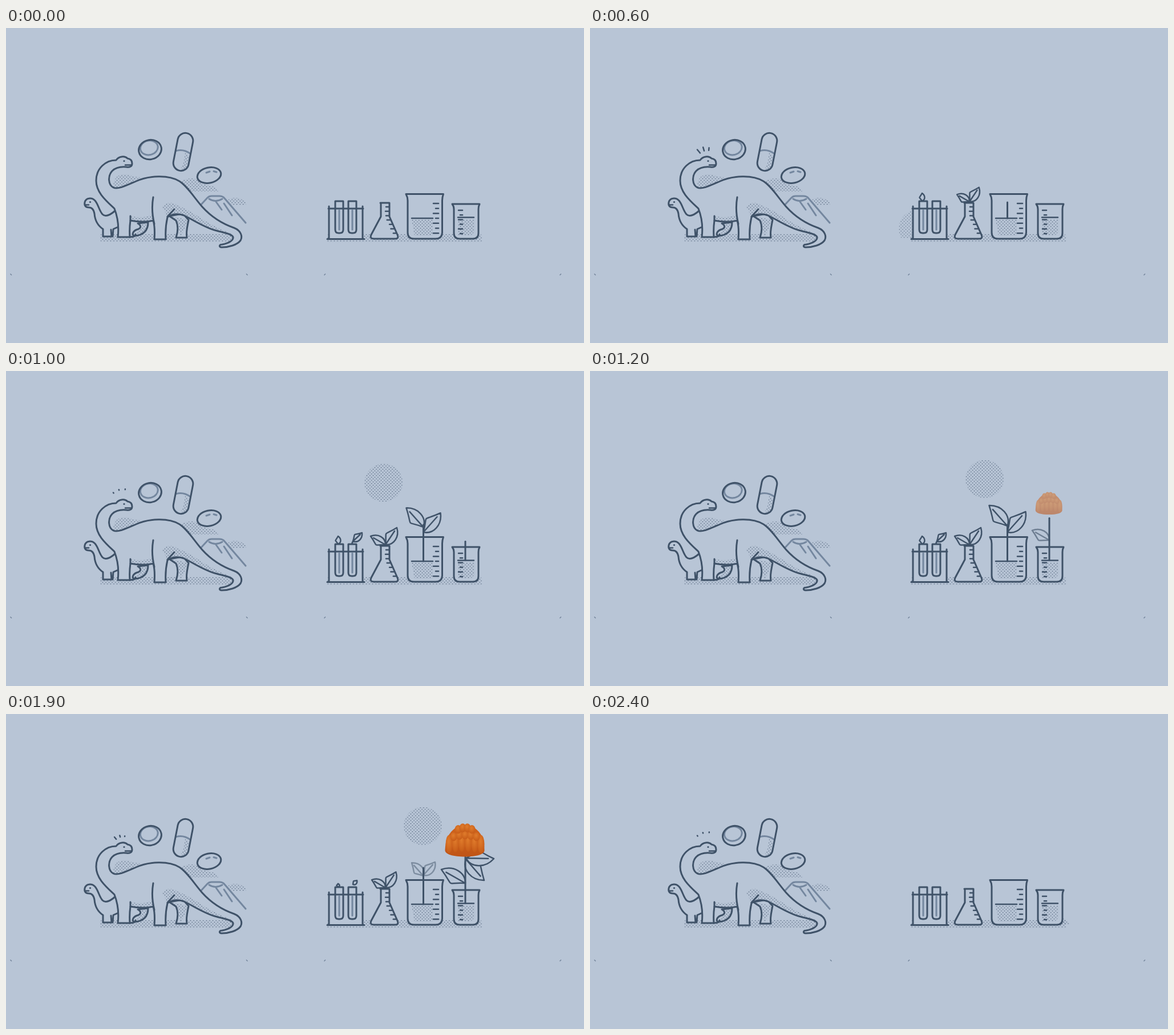
An HTML page that plays this animation: 1013 by 553 pixels, repeating every 2.5 s.

```html
<!DOCTYPE html>
<html lang="en">
<head>
<meta charset="utf-8">
<title>Growing lab</title>
<style>
  html, body { margin: 0; width: 100%; height: 100%; overflow: hidden; background: #b8c5d6; }
  svg { display: block; width: 1013px; height: 553px; }
  .ink { fill: none; stroke: #3f5268; stroke-width: 3; stroke-linecap: round; stroke-linejoin: round; }
  .solid { fill: #b8c5d6; }
  .thin { stroke-width: 2.5; }
  .soft { fill: none; stroke: #74879f; stroke-width: 3; stroke-linecap: round; stroke-linejoin: round; }
  .dots { fill: url(#dots); stroke: none; }
  .eye { fill: #3f5268; stroke: none; }
</style>
</head>
<body>
<svg viewBox="0 0 1013 553">
  <defs>
    <pattern id="dots" width="5.6" height="5.6" patternUnits="userSpaceOnUse">
      <circle cx="1.4" cy="1.4" r=".8" fill="#455870"/>
      <circle cx="4.2" cy="4.2" r=".8" fill="#455870"/>
    </pattern>
    <linearGradient id="jellyBody" x2="0" y2="1">
      <stop offset="0" stop-color="#d0641d"/>
      <stop offset="1" stop-color="#c05416"/>
    </linearGradient>
    <radialGradient id="jellyBump" cx=".45" cy=".35" r=".65">
      <stop offset="0" stop-color="#e07c2c"/>
      <stop offset="1" stop-color="#c75c18"/>
    </radialGradient>
    <clipPath id="sky"><rect width="1013" height="369"/></clipPath>
  </defs>

  <path d="M7.5 431.5l2.5 2.5M421 431.5l2.5 2.5M560 431.5l-2.5 2.5M973 431.5l-2.5 2.5" stroke="#74859b" stroke-width="1.5"/>

  <!-- clouds, ground, volcano -->
  <g class="dots">
    <rect x="165" y="362" width="232" height="13" rx="3"/>
    <path d="M188 279C188 262 198 256 209 257C217 257 219 262 238 262L200 281Z"/>
    <path d="M306 269C318 263 334 262 340 270C344 278 370 274 372 287H322Z"/>
    <path d="M387 303C396 294 421 298 421 311H396Z"/>
  </g>
  <path class="soft" d="M341 311L353 298Q356 295 360 295H374Q380 295 383 299L420 342M356 300Q367 307 379 300M368 305L378 319M382 308L396 329"/>

  <!-- dinosaurs -->
  <g class="ink">
    <path class="solid" d="M191 321C183 328 175 333 169 327C163 320 162 310 156 303C150 297 140 298 138 306C137 311 139 315 145 315C151 315 154 320 155 326C156 339 161 347 170 353V366H185L184 354M183 366H187L188 353L197 349"/>
    <path class="thin" d="M139 310.5H145"/>
    <circle class="eye" cx="147.5" cy="305.5" r="1.6"/>

    <g id="farLegs">
      <path class="solid" d="M231 343C238 347 237 352 229 354C222 357 220 363 225 365C237 364 249 359 249 341Z"/>
      <path class="solid" d="M286 330L298 338C302 347 302 356 298 368H317C315 357 318 348 320 337L310 326Z"/>
    </g>
    <path class="dots" d="M231 343Q240 350 225 363Q249 360 249 341ZM286 330L299 340L306 366L320 337Z"/>

    <path class="solid" d="M190 317C174 302 158 288 158 268C158 246 175 232 193 232C198 225 208 224 213 229C220 230 221 234 221 238C221 243 217 245 211 244C200 243 192 245 186 251C178 260 179 275 188 280C196 284 212 276 228 269C250 259 285 257 304 269C318 278 330 298 344 314C362 334 380 344 400 351C412 356 415 366 411 373C405 381 390 385 378 385C373 385 373 380 379 380C390 378 399 373 398 367C396 361 380 359 366 355C345 349 325 335 312 329C300 325 290 327 283 332C280 345 279 356 280 371H260C261 357 261 348 258 338Q240 342 218 338Q216 352 217 367H196C198 350 197 335 190 317Z"/>
    <path class="dots" d="M219 330Q240 336 257 327V337Q240 341 219 337ZM274 314C280 305 292 305 300 311Q318 318 345 336Q366 350 396 361C360 353 344 346 326 334Q305 322 283 331Z"/>
    <path d="M218 338V330M258 297Q254 320 260 344M283 331L295 318M217 367Q227 367 227 362"/>
    <path class="thin" d="M209 240.5H220"/>
    <circle class="eye" cx="207" cy="233.5" r="1.6"/>
  </g>

  <!-- pills -->
  <g transform="rotate(-12 252.5 213.5)">
    <ellipse class="soft" cx="251.5" cy="210" rx="15.5" ry="12.5"/>
    <ellipse class="ink" cx="252.5" cy="213.5" rx="20" ry="17"/>
  </g>
  <g transform="rotate(11 310.5 217.5)">
    <path class="dots" d="M314 219L323 222V238Q321 248 311 249Q317 238 314 219Z"/>
    <path class="soft" d="M298 218Q310 212 323 218"/>
    <rect class="ink" x="297" y="184" width="27" height="67" rx="13.5"/>
  </g>
  <ellipse class="ink" cx="356" cy="258.5" rx="21" ry="13.5" transform="rotate(-12 356 258.5)"/>
  <path class="soft" d="M351 254L357 252M364 251.5L369 253"/>
  <g id="burst"></g>

  <!-- laboratory -->
  <g clip-path="url(#sky)"><circle id="sun" class="dots" r="33.5"/></g>
  <rect class="dots" x="563" y="362" width="271" height="14" rx="3"/>
  <g id="tubePlants"></g>
  <g id="glass" class="ink">
    <path class="solid" d="M566 317H625V370H566Z" stroke="none"/>
    <path class="solid" d="M577 304h14v50q0 6 -6 6h-2q-6 0 -6 -6ZM600 304h14v50q0 6 -6 6h-2q-6 0 -6 -6Z"/>
    <path class="soft" d="M584 320V354M607 320V354"/>
    <path d="M566 313V370M625 313V370M565 317H626M563 370.5H628"/>
    <path class="solid" d="M656 307H672V331L686 363Q689 370 682 370H645Q637 370 640 363L657 331V307"/>
    <path class="solid" d="M701 291.5H766.5Q764.5 297 764.5 303V359Q764 370 753 370H715Q704 370 704 359V303Q704 297 701 291.5Z"/>
    <path class="solid" d="M782 309H830Q828 313 828 318V360Q828 370 818 370H795Q785 370 785 360V318Q785 313 782 309Z"/>
    <path class="dots" d="M711 337H748V365H716ZM792 336H821V358L815 364H792Z"/>
    <path class="thin" d="M711 334H748M792 332.5H820"/>
  </g>
  <g id="plants"></g>
  <g id="jelly"></g>
</svg>

<script>
const $ = id => document.getElementById(id);
const clamp = v => Math.max(0, Math.min(1, v));
const parts = []; // each one draws itself for a time in tenths of a second

function set(el, attrs) {
  for (const name in attrs) el.setAttribute(name, attrs[name]);
  return el;
}
const add = (parent, tag, attrs = {}) =>
  parent.appendChild(set(document.createElementNS("http://www.w3.org/2000/svg", tag), attrs));

// Eased growth from one time, eased shrinking from another
const easeOut = p => 1 - (1 - clamp(p)) ** 2;
const growth = (start, rise, end, fall) =>
  t => easeOut((t - start) / rise) * (1 - easeOut((t - end) / fall));
const fade = s => clamp((s - .35) / .6);

// Marks on the glass, alternately long and short, ending at a given edge
function ticks(top, step, count, edge, long, short) {
  for (let i = 0; i < count; i++) {
    const y = top + i * step;
    add($("glass"), "path", { class: "thin", d: `M${edge(y)} ${y}h${i % 2 ? -short : -long}` });
  }
}
ticks(314, 7.7, 7, y => 671 + Math.max(0, y - 331) * .44, 5, 6);
ticks(308, 8.7, 7, () => 758, 9, 5);
ticks(320, 8.2, 6, () => 800, 7, 4);

function leafPath(x, y, dx, dy) {
  const len = Math.hypot(dx, dy);
  const k = (len * .32 + 1.5) / (len || 1);
  const at = (p, side) => `${x + dx * p - dy * k * side} ${y + dy * p + dx * k * side}`;
  const side = s => `C${at(.2, s)} ${at(.7, s)} `;
  const rib = len > 20 ? "L" + at(.8, 0) : "";
  return "M" + at(0, 0) + side(1) + at(1, 0) + side(-1) + at(0, 0) + rib;
}

function leaf(layer, x, y, dx, dy, size, { fades = true, drop = 0 } = {}) {
  const el = add($(layer), "path", { class: "ink solid thin" });
  parts.push(t => {
    const s = size(t);
    set(el, {
      d: leafPath(x, y + drop * (1 - s), dx * s, dy * s),
      opacity: fades ? fade(s) : +(s > 0)
    });
  });
}

function stem(x, bottom, height, size) {
  const el = add($("plants"), "line", { class: "ink", x1: x, x2: x, y1: bottom });
  parts.push(t => set(el, { y2: bottom - height * size(t), opacity: +(size(t) > 0) }));
}

const sprout = { fades: false };
leaf("tubePlants", 582, 304, 0, -14, growth(3, 3, 18, 3), sprout);
leaf("tubePlants", 608, 299, 16, -15, growth(6, 3, 18, 3), sprout);
const tubeStem = add($("tubePlants"), "path", { class: "ink thin", d: "M606 306Q606 301 609 298" });
parts.push(t => set(tubeStem, { opacity: +(t > 7 && t < 19) }));

const flask = growth(3, 5, 18.8, 5);
leaf("plants", 665, 305, -26, -15, flask, sprout);
leaf("plants", 665, 305, 20, -30, flask, sprout);

const sapling = growth(7, 4, 18, 5);
leaf("plants", 731.5, 272, -32, -36, sapling, { drop: 34 });
leaf("plants", 731.5, 283, 32, -36, sapling);
stem(731.5, 334, 64, growth(5, 4, 19, 4));

const upper = growth(12, 3, 19, 4);
leaf("plants", 805, 297, -42, -24, growth(10.6, 3, 19, 4));
leaf("plants", 806, 255, 32, 37, upper);
leaf("plants", 806, 253, 49, 1, upper);
stem(805, 332, 83, growth(9, 4.5, 19.5, 4));

// Jelly: tiers of bumps on a dome, origin at the middle of its base
const jelly = $("jelly");
add(jelly, "path", { fill: "url(#jellyBody)", d: "M-35 -12C-34 -30 -29 -42 -16 -51Q0 -60 16 -51C29 -42 34 -30 34 -12C35 -4 20 0 0 0S-36 -4 -35 -12Z" });
for (let tier = 0; tier < 3; tier++) {
  const count = 6 - tier, width = 56 - tier * 16;
  for (let i = 0; i < count; i++) {
    const p = i / (count - 1) * 2 - 1;
    add(jelly, "ellipse", {
      cx: p * width / 2, cy: -25 - tier * 13 + p * p * 3,
      rx: 6, ry: tier ? 7.5 : 16, fill: "url(#jellyBump)"
    });
  }
}
const jellySize = growth(10.7, 3, 19, 4);
parts.push(t => {
  const s = jellySize(t);
  set(jelly, { transform: `translate(804.5 ${250.5 + 5 * (1 - s)}) scale(${s})`, opacity: fade(s) });
});

// Three lines shoot outwards above the head, twice per loop
for (let i = 0; i < 3; i++) {
  const el = add($("burst"), "path", { class: "ink thin" });
  const angle = (-130 + 23 * i) * Math.PI / 180;
  const at = p => `${206 + (20 + 8 * p) * Math.cos(angle)} ${235 + (20 + 8 * p) * Math.sin(angle)}`;
  parts.push(t => {
    const age = t < 19 ? t - 5 : t - 19;
    const head = clamp(.6 + .5 * age - .25 * i), tail = .035 * age * age;
    set(el, { d: `M${at(tail)}L${at(head)}`, opacity: +(age >= 0 && tail < head) });
  });
}

// The sun slows down to its highest point, rests, then sets
parts.push(t => {
  const degrees = t < 13 ? -1.8 * (13 - t) ** 2 : 16.8 * Math.max(0, t - 18);
  const a = degrees * Math.PI / 180;
  const x = 695.5 + 121 * Math.sin(a), y = 189.5 + 168 * (1 - Math.cos(a));
  set($("sun"), { transform: `translate(${x} ${y})`, opacity: clamp((t - 5) * .8) });
});

// The picture moves in ten steps a second
function tick() {
  const t = Math.floor(performance.now() % 2500 / 100);
  for (const draw of parts) draw(t);
  requestAnimationFrame(tick);
}
tick();
</script>
</body>
</html>
```
